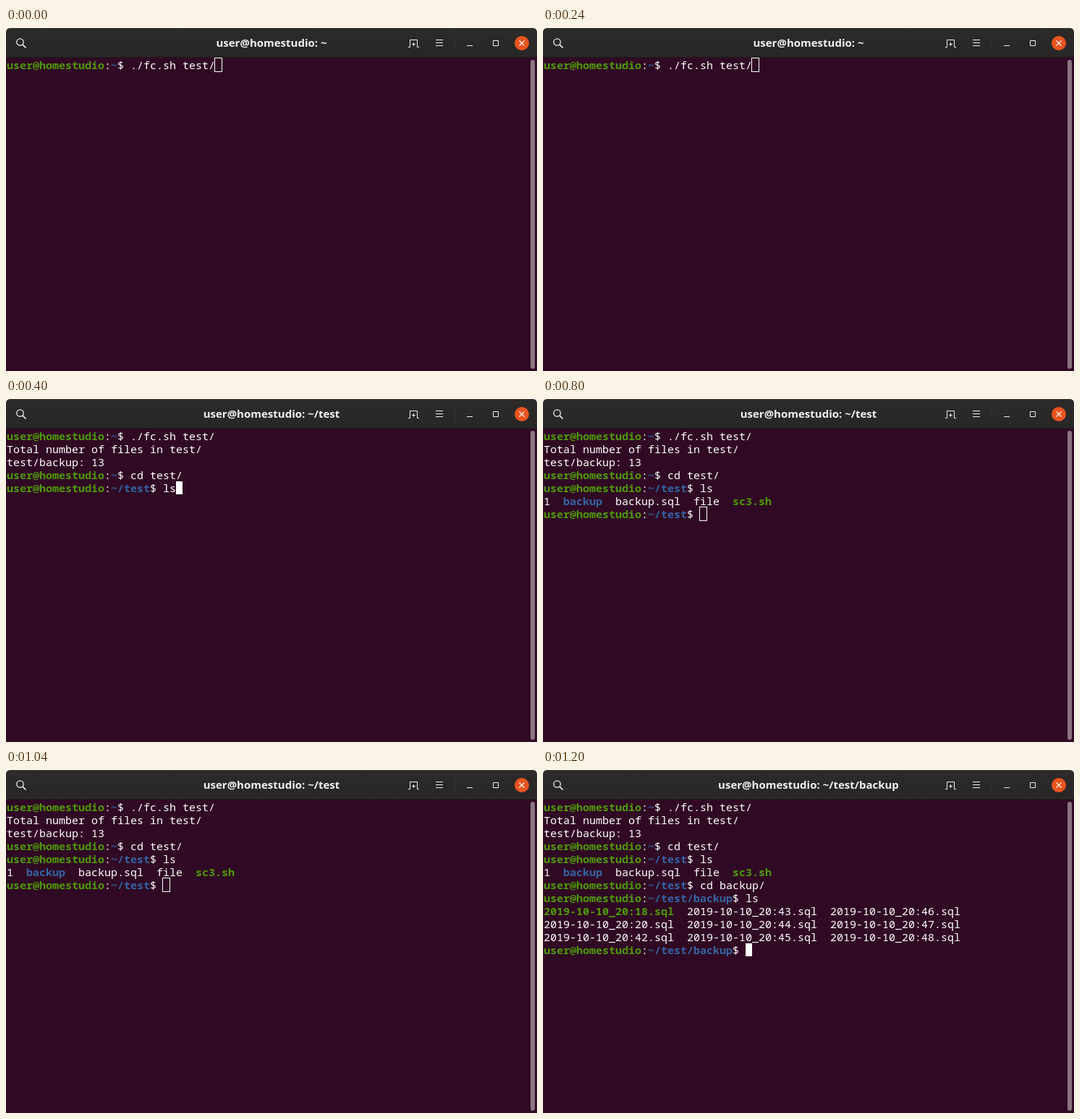
An HTML page for the animation above (1600 ms loop, 734 by 475 pixels).

```html
<!DOCTYPE html>
<html lang="en">
<head>
<meta charset="utf-8">
<title>Terminal session</title>
<style>
  html, body { margin: 0; width: 100%; height: 100%; overflow: hidden; background: #300a24; }
  svg, pre, #cursor, #scrollbar { position: absolute; }
  svg { left: 0; top: 0; }
  #title { font: 600 15px "Noto Sans", sans-serif; fill: #f2f1ef; text-anchor: middle; }
  pre {
    left: 1px; top: 42px; margin: 0;
    font: 15px/18px "Noto Sans Mono", monospace; color: #fff;
  }
  pre b { color: #4e9a06; }
  pre b.dir { color: #3465a4; }
  #cursor { box-sizing: border-box; width: 9px; height: 18px; background: #fff; }
  #cursor.hollow {
    width: 11px; height: 20px; margin: -1px 0 0 -1px;
    background: none; border: 1px solid #fff;
  }
  #scrollbar { left: 725px; top: 44px; width: 6px; height: 428px; border-radius: 3px; background: #8b747f; }
</style>
</head>
<body>
<svg width="734" height="41" fill="none" stroke="#f2f1ef">
  <defs>
    <linearGradient id="bar" x2="0" y2="1">
      <stop stop-color="#2d2b2a"/><stop offset="1" stop-color="#282726"/>
    </linearGradient>
  </defs>
  <g stroke="none">
    <path d="M0 0H734V8H0Z" fill="#fff"/>
    <path d="M0 41V6Q0 0 6 0H728Q734 0 734 6V41Z" fill="url(#bar)"/>
    <path d="M6 0H728V1H6Z" fill="#3d3b39"/>
    <path d="M0 40H734V41H0Z" fill="#1f1d1c"/>
    <path d="M620 10H621V31H620Z" fill="#353331"/>
    <text id="title" x="367" y="26"></text>
    <circle cx="713" cy="21" r="10" fill="#e95420"/>
  </g>
  <circle cx="19.5" cy="19.5" r="4.7" stroke-width="1.3"/>
  <path d="M23 23L27.5 27.5" stroke-width="1.7"/>
  <path d="M556 26.5H558.5V16.5H568.5V26.5H571M561 22.5H566M563.5 20V25"/>
  <path d="M594 16.5H604M594 20.5H604M594 24.5H604M637 24.5H645M673.5 17.5H680.5V24.5H673.5Z"/>
  <path d="M709.5 17.5L716.5 24.5M716.5 17.5L709.5 24.5" stroke-width="1.3"/>
</svg>
<pre id="screen"></pre>
<div id="cursor"></div>
<div id="scrollbar"></div>
<script>
const HOST = "user@homestudio";
const CELL = 9, LINE = 18, STEP = 400;
const byId = id => document.getElementById(id);
const screen = byId("screen"), title = byId("title"), cursor = byId("cursor");

const prompt = (path, command = "") => `<b>${HOST}</b>:<b class="dir">${path}</b>$ ${command}`;
const dump = minute => `2019-10-10_20:${minute}.sql`;
const dumpRow = minutes => minutes.map(dump).join("  ");

const counted = [
  prompt("~", "./fc.sh test/"),
  "Total number of files in test/",
  "test/backup: 13",
  prompt("~", "cd test/"),
  prompt("~/test", "ls")
];
const listed = [...counted, '1  <b class="dir">backup</b>  backup.sql  file  <b>sc3.sh</b>'];
const opened = [
  ...listed,
  prompt("~/test", "cd backup/"),
  prompt("~/test/backup", "ls"),
  `<b>${dump(18)}</b>  ` + dumpRow([43, 46]),
  dumpRow([20, 44, 47]),
  dumpRow([42, 45, 48]),
  prompt("~/test/backup")
];

const scenes = [
  { path: "~", rows: counted.slice(0, 1), hollow: true },
  { path: "~/test", rows: counted },
  { path: "~/test", rows: [...listed, prompt("~/test")], hollow: true },
  { path: "~/test/backup", rows: opened }
];

function show({ path, rows, hollow = false }) {
  title.textContent = `${HOST}: ${path}`;
  screen.innerHTML = rows.join("\n");
  const column = screen.textContent.split("\n").pop().length;
  cursor.style.left = 1 + column * CELL + "px";
  cursor.style.top = 42 + (rows.length - 1) * LINE + "px";
  cursor.classList.toggle("hollow", hollow);
}

let current = -1;
function tick() {
  const index = Math.floor(performance.now() / STEP) % scenes.length;
  if (index !== current) show(scenes[current = index]);
  requestAnimationFrame(tick);
}
tick();
</script>
</body>
</html>
```
